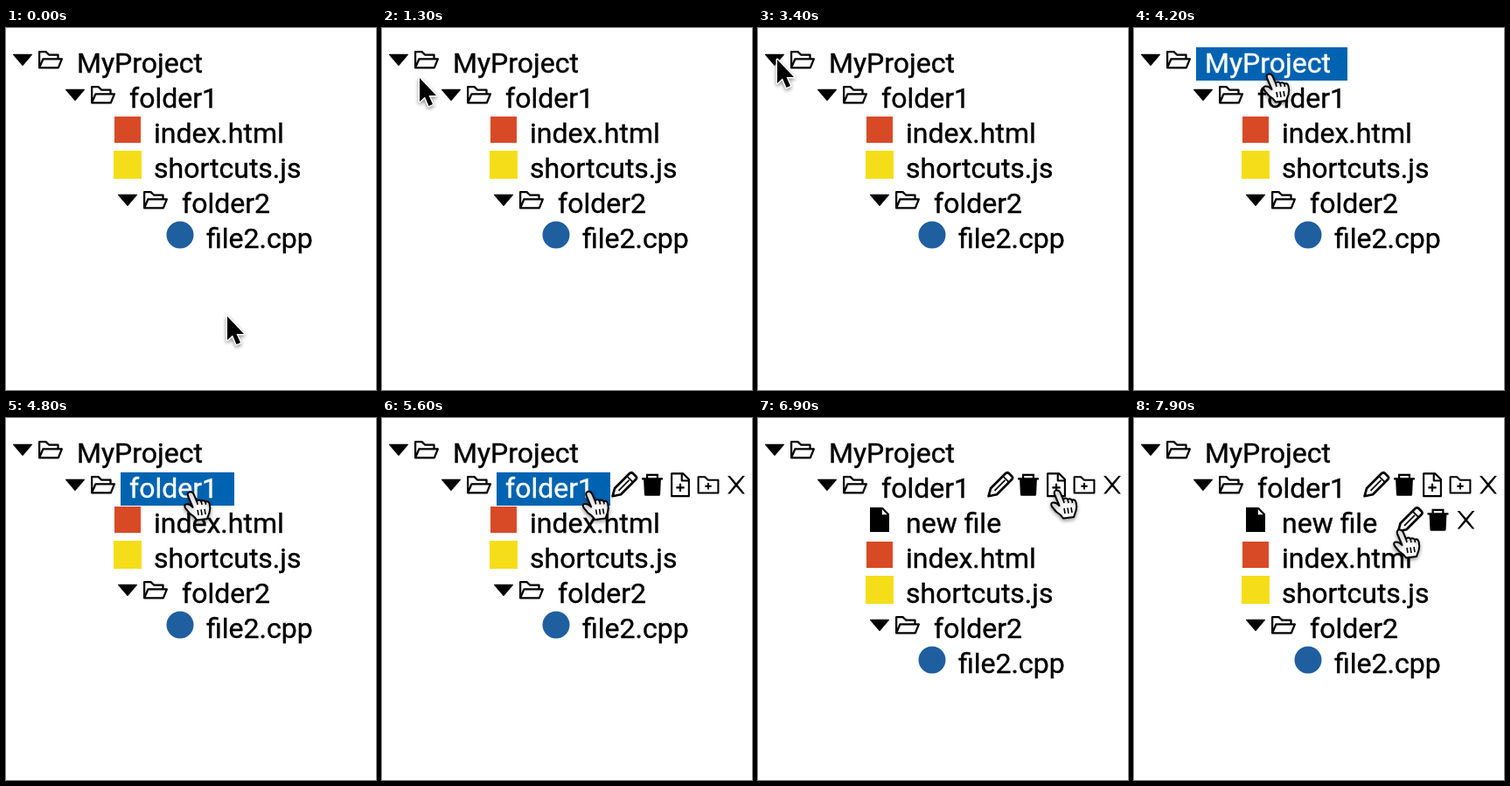
An HTML page with a canvas for the animation above (8 s loop, 423 px wide and 413 px high).

```html
<!DOCTYPE html>
<html lang="en">
<head>
<meta charset="utf-8">
<title>File tree</title>
<style>
html, body { margin: 0; width: 100%; height: 100%; overflow: hidden; background: #fff; }
canvas { display: block; width: 423px; height: 413px; }
</style>
</head>
<body>
<canvas id="stage"></canvas>
<script>
const W = 423, H = 413, LOOP = 8000, STEP = 100, ROW = 40, ICON = 32;
const BLUE = '#0063b1', SELECT = '#abcefb';
const canvas = document.getElementById('stage');
const ctx = canvas.getContext('2d');
const ratio = window.devicePixelRatio || 1;
canvas.width = W * ratio;
canvas.height = H * ratio;

// Pointer path: time, x, y
const path = [
  [0, 253, 329], [300, 152, 306], [500, 152, 306], [1300, 43, 57],
  [1400, 35, 49], [1700, 22, 36], [3800, 22, 36], [4200, 155, 53],
  [4700, 207, 85], [5100, 233, 84.5], [5500, 233, 84.5], [6400, 337, 83],
  [6700, 342, 83], [7100, 342, 83], [7500, 256, 123], [7600, 256, 123],
  [7900, 304, 128]
];

function pointerAt(t) {
  const i = path.findIndex(k => k[0] > t);
  if (i < 0) return path[path.length - 1].slice(1);
  const [t0, x0, y0] = path[i - 1], [t1, x1, y1] = path[i];
  const u = (t - t0) / (t1 - t0), e = u * u * (3 - 2 * u);
  return [x0 + (x1 - x0) * e, y0 + (y1 - y0) * e];
}

function at(x, y, draw) {
  ctx.save();
  ctx.translate(x, y);
  draw();
  ctx.restore();
}

function shape(d, fill, line, width = 2) {
  const p = new Path2D(d);
  if (fill) { ctx.fillStyle = fill; ctx.fill(p, 'evenodd'); }
  if (line) { ctx.strokeStyle = line; ctx.lineWidth = width; ctx.stroke(p); }
}

// Black glyph on a 1024 grid, filled or drawn as lines
const glyph = (d, width) => () => {
  ctx.scale(ICON / 1024, ICON / 1024);
  ctx.lineJoin = 'round';
  if (width) shape(d, null, '#000', width);
  else shape(d, '#000');
};

const FRAME = 'M148 804V220H388L506 334H876V804Z';

const icons = {
  down: glyph('M184 300H840Q880 305 859 335L530 716Q512 732 494 716L165 335Q144 305 184 300Z'),
  right: glyph('M300 184V840Q305 880 335 859L716 530Q732 512 716 494L335 165Q305 144 300 184Z'),
  open: glyph('M100 804V220H338L458 334H784V480M100 804L238 480H924L794 804Z', 72),
  closed: glyph(FRAME, 72),
  file: glyph('M160 64H630L864 300V960H160ZM602 138V326H790Z'),
  trash: glyph('M128 328V256H288V112H736V256H896V328H828L802 870Q798 912 760 912H264' +
    'Q226 912 222 870L196 328ZM360 184V256H664V184Z'),
  addFile: glyph('M196 100H618L828 310V924H196ZM568 100V360H828M512 464V760M364 612H660', 68),
  addFolder: glyph(FRAME + 'M512 436V676M392 556H632', 66),
  cross: glyph('M196 186H283L512 450 741 186H828L564 512 828 838H741L512 574 283 838H196L460 512Z'),
  pencil: () => {
    ctx.lineJoin = 'round';
    shape('M2.500 29L5 20L22 3Q24 1 26 3L29 6Q31 8 29 10L12 27Z', null, '#000', 2.7);
    shape('M19 6L26 13M9.500 22.500L21.500 10.500', null, '#000', 1.8);
  },
  orange: () => shape('M1 1h30v30h-30Z', '#d84a26'),
  yellow: () => shape('M0 0h32v32h-32Z', '#f5de19'),
  disc: () => shape('M.5 16a15.500 15.500 0 1 0 31 0a15.500 15.500 0 1 0 -31 0Z', '#1f5f9f')
};

const icon = (name, x, y) => at(x, y, icons[name]);

function shadow() {
  ctx.lineJoin = 'round';
  ctx.shadowColor = 'rgba(0,0,0,.35)';
  ctx.shadowBlur = 4 * ratio;
  ctx.shadowOffsetY = 2 * ratio;
}

function arrow() {
  const d = 'M0 0V27L6 21.500L10.500 32L15 30L10.500 20H19Z';
  shadow();
  shape(d, '#fff', '#fff', 3);
  ctx.shadowColor = 'transparent';
  shape(d, '#000');
}

function hand() {
  const d = 'M2.500 17L-3 4Q-4 0 -1 -.5Q2 -1 3.500 2L7 10Q10 7 12 10Q15 8 17 11' +
    'Q20 9 21.500 13Q23 18 21.500 23L19 30L7 31.500Q4 27 -1 24L-6 18Q-8 14 -5 13.500Q-1 13 2.500 17Z';
  shadow();
  shape(d, '#fff', '#000');
  ctx.shadowColor = 'transparent';
  shape('M7 10L8 14M12 10L13 14M17 11L17.500 14M8 20L9 26M12 19.500L13 26M16 19L17 25',
    null, '#000', 1.6);
}

const folder = (name, depth) => ({ name, depth, x: 81 + 60 * depth });
const file = (name, type, x = 169) => ({ name, type, x });

function rowsAt(t) {
  const root = folder('MyProject', 0);
  root.shut = (t >= 1900 && t < 2100) || (t >= 2900 && t < 3400);
  root.picked = t >= 2000 && t < 2700;
  if (root.shut) return [root];
  const first = folder('folder1', 1);
  if (t >= 5300) {
    first.tools = ['pencil', 'trash', 'addFile', 'addFolder', 'cross'];
    first.toolX = 261;
  }
  const rows = [root, first];
  if (t >= 6900) {
    const fresh = file('new file', 'file');
    if (t >= 7500) {
      fresh.tools = ['pencil', 'trash', 'cross'];
      fresh.toolX = 299.5;
    }
    rows.push(fresh);
  }
  rows.push(file('index.html', 'orange'), file('shortcuts.js', 'yellow'),
    folder('folder2', 2), file('file2.cpp', 'disc', 229));
  return rows;
}

const inside = (px, py, x, y, w, h) => px >= x && px < x + w && py >= y && py < y + h;

// Draws a row and tells whether the pointer is on something clickable
function drawRow(row, y, px, py) {
  const w = ctx.measureText(row.name).width;
  const left = row.x - 10, wide = Math.floor(w + 29.5);
  const hover = inside(px, py, left, y + 2, wide, 38);
  if (row.type) {
    icon(row.type, row.x - 46, y);
  } else {
    icon(row.shut ? 'right' : 'down', row.x - 78, y + .3);
    icon(row.shut ? 'closed' : 'open', row.x - 46, y + .3);
  }
  if (hover) {
    ctx.fillStyle = BLUE;
    ctx.fillRect(left, y + 2, wide, 38);
  }
  if (row.picked) {
    ctx.fillStyle = SELECT;
    ctx.fillRect(row.x, y, w, ROW);
  }
  ctx.fillStyle = ctx.strokeStyle = hover ? '#fff' : '#000';
  ctx.lineWidth = .4;
  ctx.fillText(row.name, row.x, y + 31);
  ctx.strokeText(row.name, row.x, y + 31);
  let active = hover;
  (row.tools || []).forEach((name, i) => {
    const x = row.toolX + ICON * i;
    icon(name, x, y + .3);
    active = active || inside(px, py, x, y, ICON, ICON);
  });
  return active;
}

function draw(t) {
  ctx.setTransform(ratio, 0, 0, ratio, 0, 0);
  ctx.fillStyle = '#fff';
  ctx.fillRect(0, 0, W, H);
  ctx.font = '32px Roboto, sans-serif';
  const [px, py] = pointerAt(t);
  let active = false;
  rowsAt(t).forEach((row, i) => {
    if (drawRow(row, 20 + ROW * i, px, py)) active = true;
  });
  at(px, py, active ? hand : arrow);
}

function tick() {
  const t = performance.now() % LOOP;
  draw(Math.floor(t / STEP) * STEP);
  requestAnimationFrame(tick);
}
tick();
</script>
</body>
</html>
```
